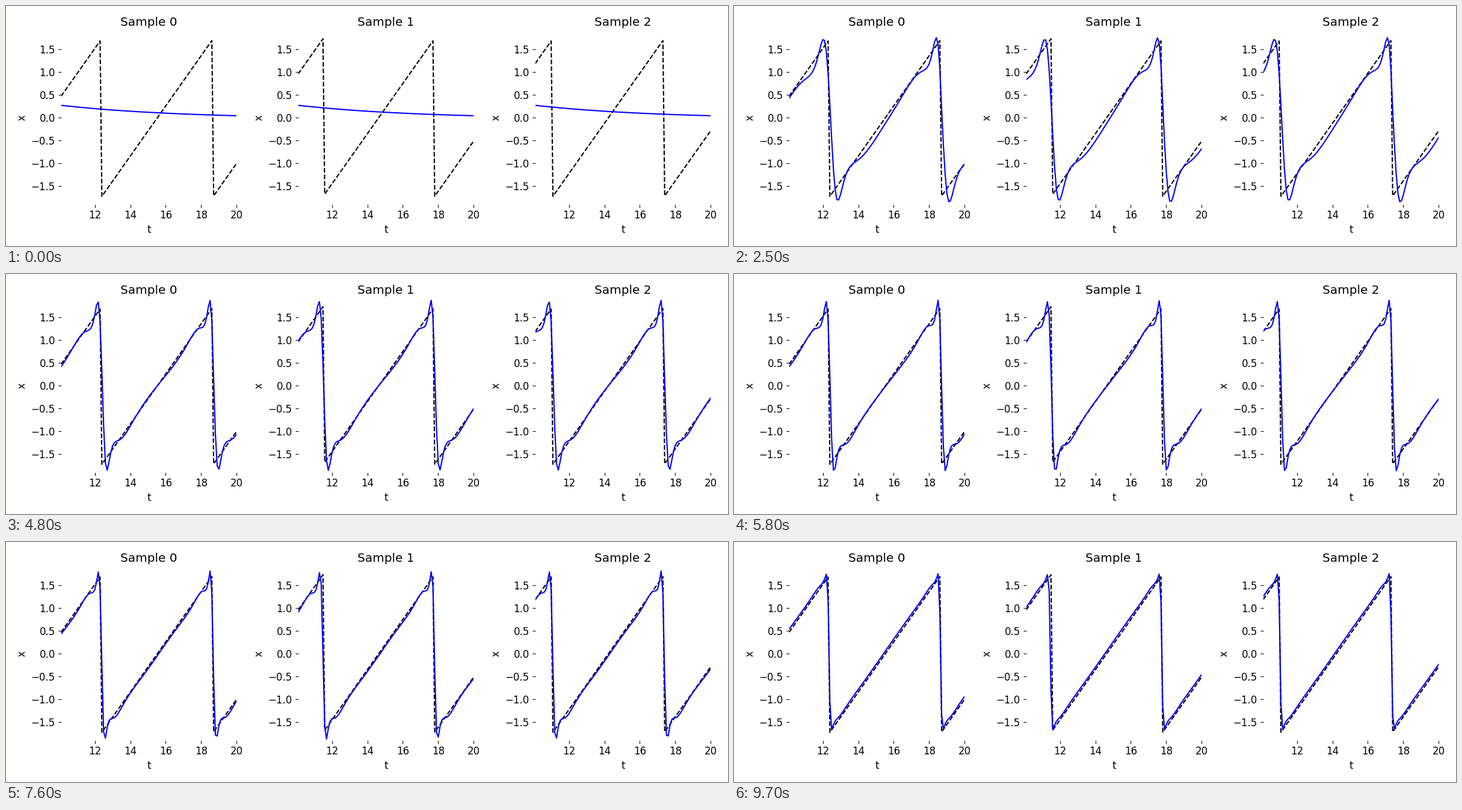
Recreate the animation shown at these times as a matplotlib script. Size 1200 px wide and 400 px high, loop 9.8 s.

```python
import numpy as np
import matplotlib.pyplot as plt
from matplotlib.animation import FuncAnimation

plt.rcParams.update({"font.size": 12, "font.family": "DejaVu Sans"})

FRAMES = 98
PERIOD = 2 * np.pi
AMP = np.sqrt(3)
SLOPE = 2 * AMP / PERIOD
RESETS = (12.391, 11.503, 11.09)
t = np.linspace(10.1, 20, 100)

# Sine integral, the shape of a band-limited step
grid = np.linspace(0, 30, 3001)
si = np.concatenate([[0], np.cumsum(np.sinc((grid[1:] - 0.005) / np.pi) * 0.01)])


def sawtooth(reset):
    return AMP * (2 * ((t - reset) % PERIOD) / PERIOD - 1)


def step(s, k_before, k_after, ringing):
    """Step from 0 to 1 at s = 0 whose ripples widen and fade outwards."""
    v = np.abs(s) * np.where(s < 0, k_before, k_after)
    v = 5 * np.arcsinh(v / 5)
    rest = 1 - 2 / np.pi * np.interp(v, grid, si)
    rest *= np.where(v > 1.93, ringing * np.exp(-0.1 * (v - 1.93)), 1)
    return (1 + np.sign(s) * (1 - rest)) / 2


def prediction(frame, reset):
    """The fit sharpens, its delay shrinks and its ripples die out."""
    p = frame / (FRAMES - 1)
    sharp = 2.2 + 20 * p
    delay = 0.06 - 0.1 * p ** 2
    ringing = 1 - 0.8 * p ** 5
    offset = np.interp(frame, (8, 16, 34, 48, 76, 97),
                       (0.1, -0.06, -0.13, -0.02, -0.04, 0.06))

    s = t - reset - delay
    wave = AMP + SLOPE * (t - reset) + offset
    wave -= 2 * AMP * step(s, sharp, sharp, ringing)
    wave -= 2 * AMP * step(s - PERIOD, sharp + 2, sharp, ringing)

    decay = 0.3 * np.exp(-(t - 10.1) / 6.9) - 0.03
    g = min(1, frame / 7)
    g = g * g * (3 - 2 * g)
    return decay + g * (wave - decay)


fig, axes = plt.subplots(1, 3, figsize=(12, 4), dpi=100, facecolor="white")
lines = []
for i, (ax, reset) in enumerate(zip(axes, RESETS)):
    ax.plot(t, sawtooth(reset), "k--")
    lines += ax.plot(t, prediction(0, reset), "b")
    ax.set_xlim(t[0], t[-1])
    ax.set_ylim(-1.1 * AMP, 1.1 * AMP)
    ax.set_xticks(range(12, 21, 2))
    ax.set_yticks(np.arange(-1.5, 1.6, 0.5))
    ax.set_title(f"Sample {i}")
    ax.set_xlabel("t")
    ax.set_ylabel("x")
    ax.set_frame_on(False)
fig.tight_layout()


def update(frame):
    for line, reset in zip(lines, RESETS):
        line.set_ydata(prediction(frame, reset))
    return lines


anim = FuncAnimation(fig, update, frames=FRAMES, interval=100, repeat=True)
plt.show()
```
